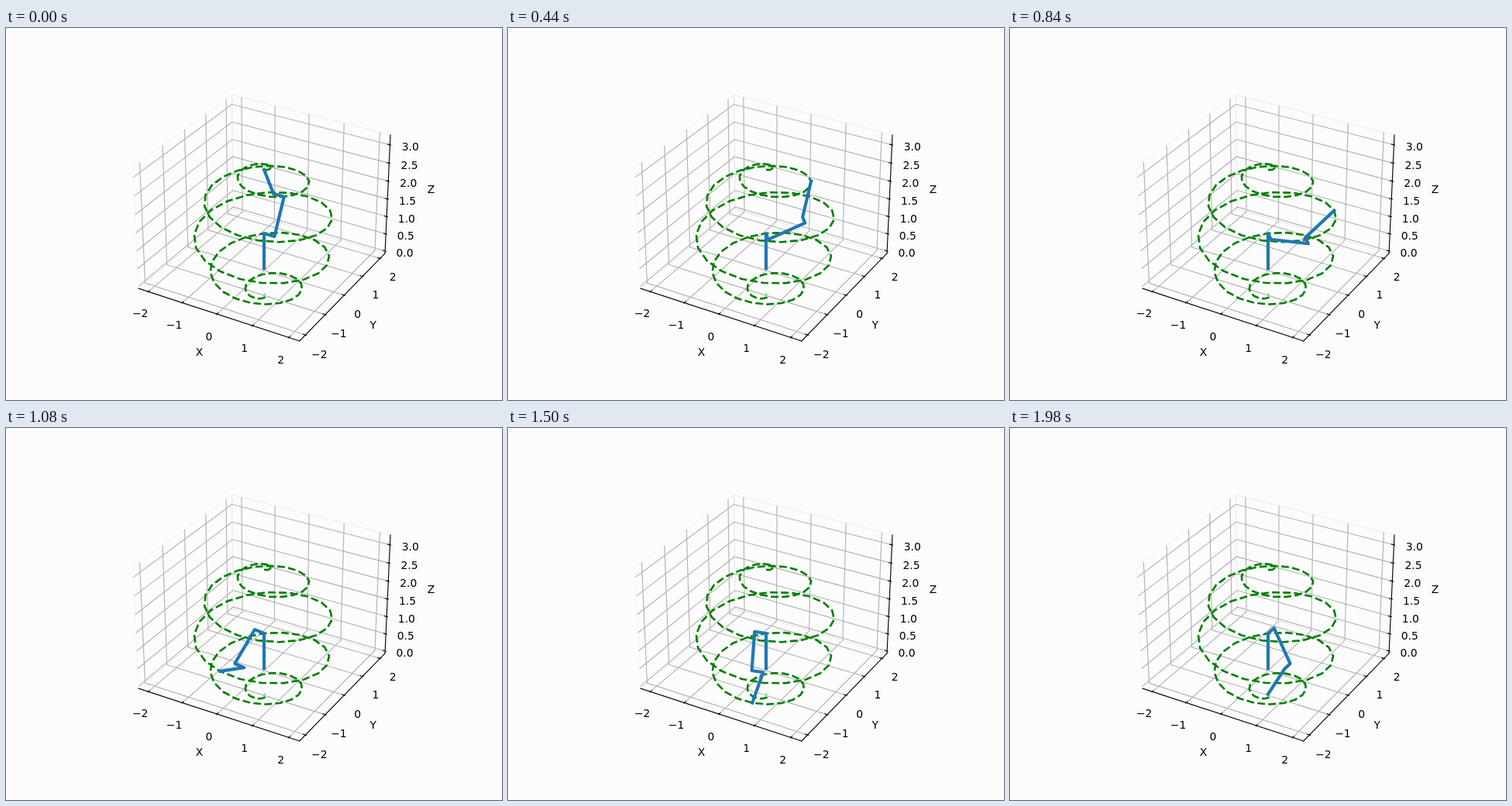
Animation, 640 px wide and 480 px high, one loop 2000 ms. Source, as an HTML page:

```html
<!DOCTYPE html>
<html lang="en">
<head>
<meta charset="utf-8">
<title>Robot arm on a spherical spiral</title>
<style>
  html, body { margin: 0; width: 100%; height: 100%; overflow: hidden; background: #fcfcfc; }
  svg { display: block; }
  polyline, path { fill: none; }
  text { font: 13.89px "DejaVu Sans", sans-serif; text-anchor: middle; }
  .pane { stroke-width: 1.39; stroke-opacity: .5; }
  .grid { stroke: #b0b0b0; stroke-width: 1.11; }
  .axis { stroke: #000; stroke-width: 1.11; stroke-linecap: square; }
  .tick { stroke: #000; stroke-width: 1.11; }
  .spiral { stroke: #008000; stroke-width: 2.667; stroke-dasharray: 9.87 4.27; stroke-linejoin: round; }
  .arm { stroke: #1f77b4; stroke-width: 4.167; stroke-linecap: square; stroke-linejoin: round; }
</style>
</head>
<body>
<svg id="stage" width="640" height="480" viewBox="0 0 640 480"></svg>
<script>
const { sin, cos, atan2, sqrt, hypot, PI } = Math;
const FRAMES = 100, STEP = 20;
const REACH = 2.2, TOP = 3.2, RADIUS = 1.76, TURNS = 5;
const LINK = 1, OFFSET = 0.3, SHOULDER = 1;

// Perspective view: elevation 30, azimuth -60, distance 10
const C = sqrt(3) / 2;
function project([x, y, z]) {
  const kx = 4 / 7 / REACH, kz = 6 / 7 / TOP;
  const right = (C * x + y / 2) * kx;
  const back = (C * y - x / 2) * kx;
  const up = (z - TOP / 2) * kz;
  const s = 369.6 / 0.185 / (10 - up / 2 + C * back);
  return [332.99 + right * s, 237.41 - (back / 2 + C * up) * s];
}

const points = list => list.map(p => project(p).map(v => v.toFixed(2)).join()).join(" ");
const line = (cls, list, extra = "") => `<polyline class="${cls}" points="${points(list)}" ${extra}/>`;
function label(text, p, drop) {
  const [x, y] = project(p);
  return `<text x="${x.toFixed(2)}" y="${(y + drop).toFixed(2)}">${text}</text>`;
}

// Axes box, slightly wider than the limits
const m = REACH * 25 / 24, lo = -TOP / 48, hi = TOP * 49 / 48;
const dx = REACH / 6, dz = TOP / 12;

function axes() {
  const corner = [-m, m, lo];
  const pane = (grey, list) => line("pane", [...list, list[0]], `stroke="rgb(${grey},${grey},${grey})"`);
  let back = pane(242, [[-m, -m, lo], corner, [-m, m, hi], [-m, -m, hi]])
    + pane(230, [corner, [m, m, lo], [m, m, hi], [-m, m, hi]])
    + pane(236, [[-m, -m, lo], corner, [m, m, lo], [m, -m, lo]]);
  let front = line("axis", [[-m, -m, lo], [m, -m, lo]])
    + line("axis", [[m, -m, lo], [m, m, lo]])
    + line("axis", [[m, m, lo], [m, m, hi]]);
  const near = 1.037, far = 2.255, out = 0.1 * dx, inn = 0.2 * dx;

  for (let v = -2; v <= 2; v++) {
    const name = String(v).replace("-", "\u2212");
    back += line("grid", [[v, -m, lo], [v, m, lo], [v, m, hi]])
      + line("grid", [[m, v, lo], [-m, v, lo], [-m, v, hi]]);
    front += line("tick", [[v, -m - out, lo], [v, -m + inn, lo]])
      + line("tick", [[m + out, v, lo], [m - inn, v, lo]])
      + label(name, [v, -m - near * dx, lo - near * dz], 11)
      + label(name, [m + near * dx, v, lo - near * dz], 11);
  }
  for (let z = 0; z <= 3; z += 0.5) {
    back += line("grid", [[-m, -m, z], [-m, m, z], [m, m, z]]);
    front += line("tick", [[m + out, m, z], [m - inn, m, z]])
      + label(z.toFixed(1), [m + near * dx, m + near * dx, z], 11);
  }
  const wide = m + far * dx, low = lo - far * dz;
  front += label("X", [0, -wide, low], 4.5)
    + label("Y", [wide, 0, low], 4.5)
    + label("Z", [wide, wide, TOP / 2], 4.5);
  return back + front;
}

function target(i) {
  const t = PI * i / (FRAMES - 1), a = 2 * TURNS * t, r = RADIUS * sin(t);
  return [r * cos(a), r * sin(a), SHOULDER + RADIUS * cos(t)];
}

function arm(i) {
  const tip = target(i), [x, y, z] = tip;
  // At the upper pole this form turns the arm towards +y
  const turn = atan2(x, -y) - PI / 2;
  const r = hypot(x, y), h = z - SHOULDER;
  const bend = sqrt(LINK ** 2 - RADIUS ** 2 / 4) / RADIUS;
  const er = r / 2 + h * bend, ez = SHOULDER + h / 2 - r * bend;
  const place = (along, side, height) => [
    along * cos(turn) + side * sin(turn),
    along * sin(turn) - side * cos(turn),
    height
  ];
  return [
    [0, 0, 0], [0, 0, SHOULDER],
    place(0, OFFSET, SHOULDER),
    place(er, OFFSET, ez),
    place(er, 0, ez),
    tip
  ];
}

const stage = document.getElementById("stage");
const path = Array.from({ length: FRAMES }, (_, i) => target(i));
stage.innerHTML = axes() + line("spiral", path) + line("arm", arm(0));
const armLine = stage.querySelector(".arm");

const start = performance.now();
function draw() {
  const i = Math.floor((performance.now() - start) / STEP) % FRAMES;
  armLine.setAttribute("points", points(arm(i)));
  requestAnimationFrame(draw);
}
draw();
</script>
</body>
</html>
```
